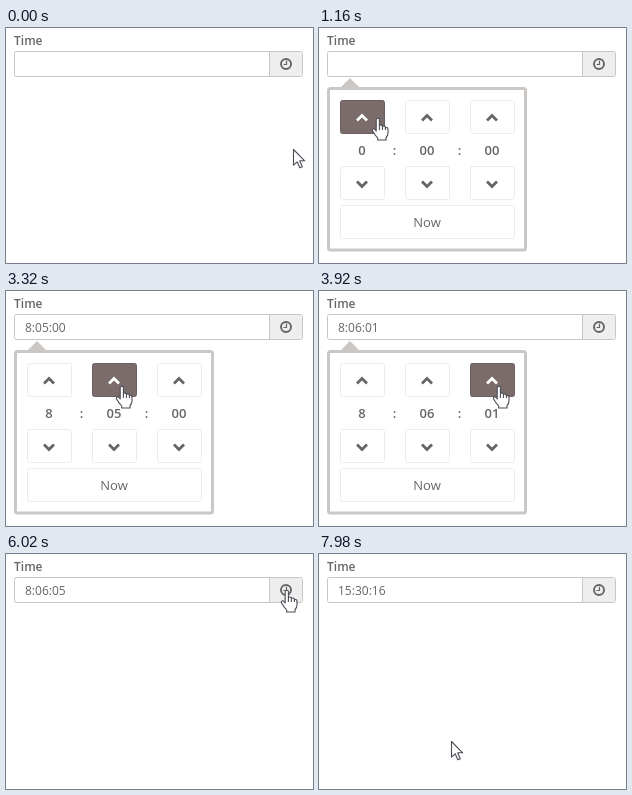
Animation, 307 px wide and 235 px high, one loop 8000 ms. Source, as an HTML page:

```html
<!DOCTYPE html>
<html lang="en">
<head>
<meta charset="utf-8">
<title>Time picker</title>
<style>
  html, body { margin: 0; width: 100%; height: 100%; overflow: hidden; background: #fff; }
  svg { display: block; width: 307px; height: 235px; }
  text { font: 12px "Open Sans", sans-serif; fill: #686464; }
  #label, .num { font-weight: 600; }
  .num, .now { font-size: 13px; text-anchor: middle; }
  .box { fill: #fff; stroke: #ececec; }
  .chevron { fill: none; stroke: #686464; stroke-width: 2.8; }
  .hover .box { fill: #7a6c6b; stroke: #6b5e5d; }
  .hover .chevron { stroke: #fff; }
  .hover text { fill: #fff; }
  .cursor { fill: #fff; stroke: #4c4a55; stroke-width: 1.1; stroke-linejoin: round; }
</style>
</head>
<body>
<svg viewBox="0 0 307 235">
  <text id="label" x="8" y="17">Time</text>
  <rect x="8.5" y="23.5" width="288" height="25" rx="2" fill="#fff" stroke="#c8c6c6"/>
  <path d="M264 24H295Q296 24 296 25V47Q296 48 295 48H264Z" fill="#eee"/>
  <path d="M263.5 24V48" stroke="#c8c6c6"/>
  <g fill="none" stroke="#686464">
    <circle cx="280" cy="36" r="5" stroke-width="1.9"/>
    <path d="M280.5 32.8V36.5H277.5" stroke-width="1.2"/>
  </g>
  <text id="value" x="19" y="41"></text>
  <g id="popup">
    <path d="M21 60L31 50L41 60Z" fill="#cac7c5"/>
    <rect x="9.5" y="60.5" width="197" height="161.5" rx="2" fill="#fff" stroke="#cac7c5" stroke-width="3"/>
  </g>
  <path id="arrow" class="cursor" d="M.5 .5V16.2L4.2 12.8L6.8 18.8L9.3 17.7L6.7 11.8H11.7Z"/>
  <path id="hand" class="cursor" d="M-1.8 13V1.8Q-1.8 .3 -.2 .3Q1.4 .3 1.4 1.8V7.5Q2.6 6.3 4.4 7.7V8.5Q6 7.4 7.4 8.9V9.7Q10 9 10 11.5V15Q10 18 8 19.5V22H-.3V20Q-3.5 16.5 -5.6 12.7Q-5.7 10.3 -3.8 10.8ZM1.4 7.5V12M4.4 8V12M7.4 9V12"/>
</svg>
<script>
  const LOOP = 8000;
  const $ = id => document.getElementById(id);
  const popup = $('popup');
  const pad = n => String(n).padStart(2, '0');

  function add(parent, tag, attrs, text) {
    const node = document.createElementNS('http://www.w3.org/2000/svg', tag);
    for (const key in attrs) node.setAttribute(key, attrs[key]);
    if (text) node.textContent = text;
    return parent.appendChild(node);
  }

  const buttons = [];
  function addButton(x, y, w, h) {
    const node = add(popup, 'g', {});
    add(node, 'rect', { class: 'box', x: x + .5, y: y + .5, width: w - 1, height: h - 1, rx: 2 });
    buttons.push({ node, x, y, w, h });
    return node;
  }

  const digits = [43, 108, 173].map(cx => {
    const up = addButton(cx - 22, 72, 45, 34);
    add(up, 'path', { class: 'chevron', d: `M${cx - 5} 92.5l5 -5l5 5` });
    const down = addButton(cx - 22, 138, 45, 34);
    add(down, 'path', { class: 'chevron', d: `M${cx - 5} 153.5l5 5l5 -5` });
    return add(popup, 'text', { class: 'num', x: cx, y: 127 });
  });
  for (const x of [75.5, 140.5]) add(popup, 'text', { class: 'num', x, y: 127 }, ':');
  add(addButton(21, 177, 175, 34), 'text', { class: 'now', x: 108, y: 199 }, 'Now');

  // start, end, target, optional control point
  const start = [287, 121];
  const moves = [
    [240, 520, [281, 36]],
    [640, 1160, [59, 90], [170, 130]],
    [2460, 2700, [116, 95], [86, 94]],
    [3540, 3760, [180, 95]],
    [4500, 4700, [258, 122]],
    [5660, 6020, [281, 36]],
    [6220, 6800, [131, 189], [104, 106]],
    [7920, 7980, [132, 187]]
  ];

  function pointer(t) {
    let p = start;
    for (const [from, to, end, ctrl] of moves) {
      if (t < from) break;
      const k = Math.min(1, (t - from) / (to - from));
      const u = k * k * (3 - 2 * k);
      const a = p;
      p = a.map((v, i) => {
        const c = ctrl ? ctrl[i] : (v + end[i]) / 2;
        return (1 - u) ** 2 * v + 2 * u * (1 - u) * c + u * u * end[i];
      });
    }
    return p;
  }

  // number of evenly spaced clicks made by time t
  const clicks = (t, first, gap, max) =>
    t < first ? 0 : Math.min(max, 1 + Math.floor((t - first) / gap));

  const timeAt = t => t >= 7340 ? [15, 30, 16] : [
    clicks(t, 1520, 114, 8),
    clicks(t, 2860, 114, 6),
    t >= 4400 ? 5 : clicks(t, 3920, 113, 4)
  ];

  const isOpen = t => (t >= 580 && t < 4880) || (t >= 6120 && t < 7340);
  const inside = ([px, py], b) => px >= b.x && px < b.x + b.w && py >= b.y && py < b.y + b.h;
  const clock = { x: 264, y: 24, w: 33, h: 25 };

  function draw(t) {
    const [h, m, s] = timeAt(t);
    const open = isOpen(t);
    const p = pointer(t);
    $('value').textContent = t < 1520 ? '' : `${h}:${pad(m)}:${pad(s)}`;
    [h, pad(m), pad(s)].forEach((v, i) => digits[i].textContent = v);
    popup.style.display = open ? '' : 'none';

    let over = inside(p, clock) || (t >= 7340 && t < 7360);
    for (const b of buttons) {
      const hit = open && inside(p, b);
      b.node.setAttribute('class', hit ? 'hover' : '');
      over = over || hit;
    }
    $('hand').style.display = over ? '' : 'none';
    $('arrow').style.display = over ? 'none' : '';
    $(over ? 'hand' : 'arrow').setAttribute('transform', `translate(${p.map(Math.round)})`);
  }

  const origin = performance.now();
  function tick() {
    draw((performance.now() - origin) % LOOP);
    requestAnimationFrame(tick);
  }
  tick();
</script>
</body>
</html>
```
